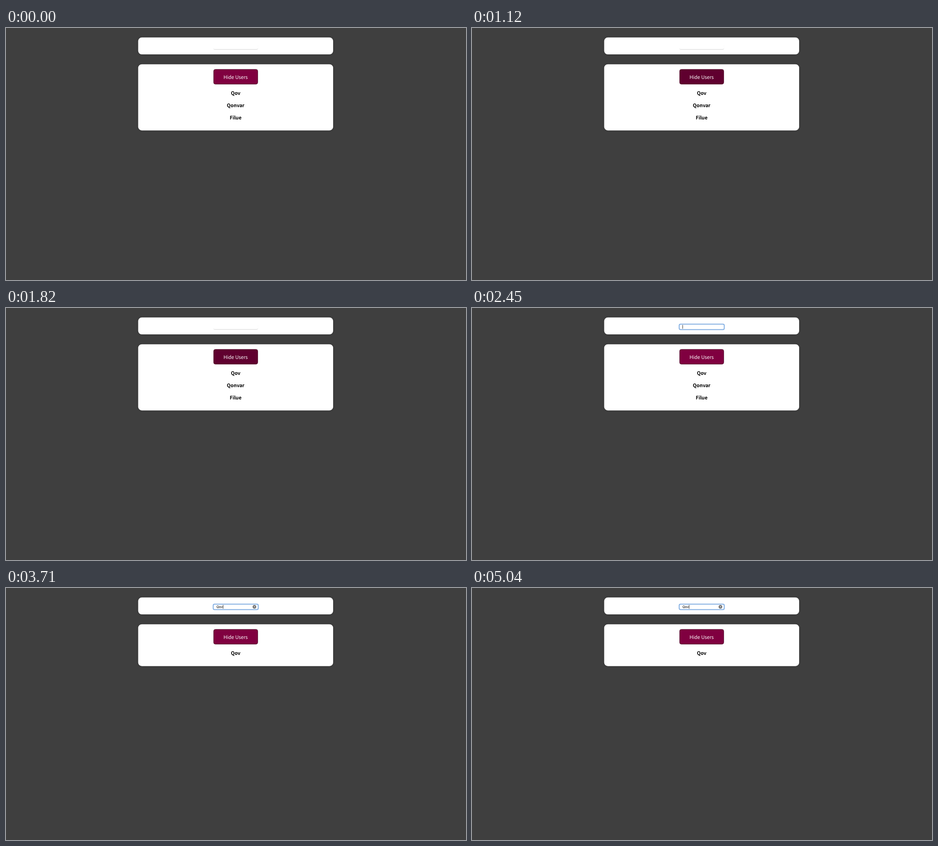
Write an HTML page that moves like this. It is 1011 by 554 pixels and loops after 5.25 s.

```html
<!DOCTYPE html>
<html lang="en">
<head>
<meta charset="utf-8">
<title>User filter</title>
<style>
  html, body { margin: 0; width: 100%; height: 100%; overflow: hidden; background: #3f3f3f; }
  svg { display: block; width: 1011px; height: 554px; }
  text { font: 10.7px "Noto Sans CJK JP", "Noto Sans CJK SC", "Noto Sans", sans-serif; text-rendering: geometricPrecision; }
  .card { fill: #fff; filter: drop-shadow(0 .7px 2px rgba(0, 0, 0, .22)); }
  .name { font-weight: 700; text-anchor: middle; }
  #label { fill: #fff; text-anchor: middle; }
  #query { font: 7.4px Inter, "Liberation Sans", sans-serif; }
</style>
</head>
<body>
<svg viewBox="0 0 1011 554">
  <rect class="card" x="290.5" y="20.8" width="428.5" height="37.3" rx="8"/>
  <rect id="list" class="card" x="290.5" y="79.7" width="428.5" height="145.5" rx="8"/>

  <rect x="456" y="37" width="97.7" height="10.4" rx="3" fill="#c4c4c4"/>
  <rect x="455.8" y="36.4" width="98.1" height="10.3" rx="3" fill="#fff"/>
  <rect id="ring" x="455.4" y="35.5" width="99" height="12" rx="3" fill="#fff" stroke="#82aee2" stroke-width="2"/>
  <text id="query" x="462.4" y="44.1"></text>
  <rect id="caret" y="37.3" width="1" height="8.2" fill="#222"/>
  <g id="clear">
    <circle cx="546" cy="41.3" r="3.9" fill="#6c6c6c"/>
    <path d="M544.5 39.8l3 3m0-3l-3 3" stroke="#fff" stroke-width=".9"/>
  </g>

  <rect id="button" y="90.9" height="32.6" rx="4" stroke-width=".8"/>
  <text id="label" x="504.7" y="111.6"></text>
  <text class="name" x="504.7" y="147.2">Qov</text>
  <text class="name" x="504.7" y="174">Qonvar</text>
  <text class="name" x="504.7" y="200.8">Filue</text>
</svg>
<script>
const LOOP = 5250;
const el = id => document.getElementById(id);
const [list, ring, query, caret, clear, button, label] =
  ["list", "ring", "query", "caret", "clear", "button", "label"].map(el);
const names = [...document.querySelectorAll(".name")];
const within = (t, from, to) => t >= from && t < to;
const show = (node, on) => node.setAttribute("visibility", on ? "visible" : "hidden");
const set = (node, attrs) => {
  for (const key in attrs) node.setAttribute(key, attrs[key]);
};

function caretAlpha(t) {
  if (t < 4270) return 1;
  if (t < 4410) return t < 4340 ? .65 : .3;
  if (t < 4830) return 0;
  return t < 4970 ? .25 : t < 5040 ? .65 : 1;
}

function draw(now) {
  const t = now % LOOP;
  const hidden = within(t, 1190, 1820);
  const hover = within(t, 910, 2170) || within(t, 4340, 4550);
  const focus = within(t, 280, 1050) || t >= 2450;
  const typed = "Qov".slice(0, [3080, 3290, 3710].filter(at => t >= at).length);
  const matches = names.filter(n => !hidden && n.textContent.startsWith(typed));

  names.forEach(n => show(n, matches.includes(n)));
  set(list, { height: hidden ? 54.8 : 65.2 + 26.77 * matches.length });

  const width = hidden ? 101.8 : 97;
  set(button, {
    x: 504.8 - width / 2,
    width,
    fill: hover ? "#60002f" : "#800040",
    stroke: hover ? "#46001f" : "#3a001c"
  });
  label.textContent = hidden ? "Show Users" : "Hide Users";

  show(ring, focus);
  show(clear, typed);
  show(caret, focus);
  query.textContent = typed;
  set(caret, {
    x: 462.5 + (typed ? query.getComputedTextLength() : 0),
    opacity: caretAlpha(t)
  });
}

const start = performance.now();
function tick() {
  draw(performance.now() - start);
  requestAnimationFrame(tick);
}
tick();
</script>
</body>
</html>
```
